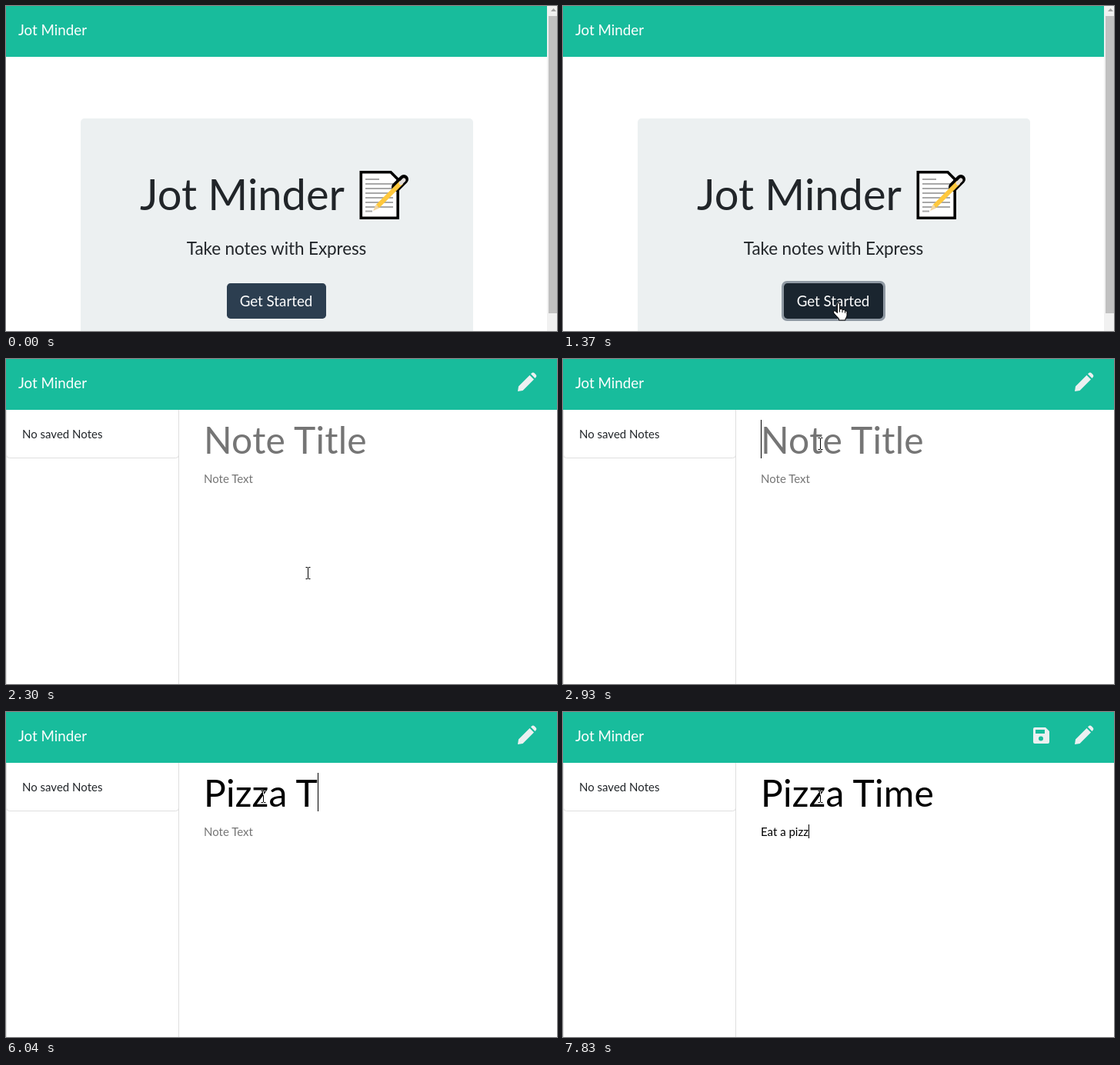
Write an HTML page that moves like this. It is 716 px wide and 422 px high and loops after 8000 ms.

```html
<!DOCTYPE html>
<html lang="en">
<head>
<meta charset="utf-8">
<title>Jot Minder</title>
<style>
html, body { margin: 0; width: 716px; height: 422px; overflow: hidden; background: #fff; }
svg { display: block; }
text { font: 15px Lato, sans-serif; fill: #212529; white-space: pre; }
.large { font-size: 18.75px; fill: #fff; }
.title { font-size: 48px; letter-spacing: .22px; }
.cursor { fill: #fff; stroke: #000; stroke-linejoin: round; }
#beam { fill: none; stroke: #fff; mix-blend-mode: difference; }
</style>
</head>
<body>
<svg width="716" height="422" viewBox="0 0 716 422">
  <rect width="716" height="422" fill="#fff"/>
  <rect width="716" height="66" fill="#18bc9c"/>
  <text class="large" x="16" y="37.5">Jot Minder</text>

  <g id="home">
    <rect x="703" width="13" height="422" fill="#f1f1f1"/>
    <rect x="705" y="13" width="11" height="386" fill="#c1c1c1"/>
    <path d="M708 7l3.5-4 3.5 4z" fill="#a3a3a3"/>
    <rect x="97" y="146" width="510" height="300" rx="5" fill="#ecf0f1"/>
    <text x="174" y="265" style="font-size:56px">Jot Minder</text>
    <g id="memo">
      <path d="M461.3 215.8H500L509.2 225V275.2H461.3Z" fill="#fff" stroke="#000" stroke-width="3.6"/>
      <path d="M467 225h18M467 231h36M467 237h36M467 243h36M467 249h36M467 255h36M467 261h36M467 266.5h9" stroke="#a8a8a8" stroke-width="1.8"/>
      <path d="M507 235L517 225" stroke="#000" stroke-width="12" stroke-linecap="round"/>
      <path d="M483 260L514 229" stroke="#ffc83d" stroke-width="6"/>
      <path d="M513 230L517 226" stroke="#e3dedb" stroke-width="5" stroke-linecap="round"/>
      <path d="M477 266l3.5-8 4.5 4.5z" fill="#f3d6a0"/>
    </g>
    <text x="351.5" y="322.5" text-anchor="middle" style="font-size:22.5px;letter-spacing:-.1px">Take notes with Express</text>
    <rect id="ring" x="284" y="357" width="135" height="52" rx="7" fill="#8f99a3"/>
    <rect id="button" x="287" y="360" width="129" height="46" rx="4.7"/>
    <text class="large" x="351" y="390" text-anchor="middle">Get Started</text>
  </g>

  <g id="notes">
    <path d="M.5 66V422M224.5 66V422" stroke="#dfdfdf"/>
    <g id="empty">
      <path d="M.5 66V124.5q0 4 4 4H220.5q4 0 4-4V66" fill="none" stroke="#dfdfdf"/>
      <text x="21" y="103">No saved Notes</text>
    </g>
    <g fill="#ecf0f1">
      <path d="M665 42l1-6.5L680.5 21l5.5 5.5L671.5 41zM682 19.5l1.2-1.2q1.7-1.7 3.4 0l2 2q1.7 1.7 0 3.4l-1.2 1.2z"/>
      <g id="save">
        <path d="M613 20H627l5 5V39q0 2-2 2H613q-2 0-2-2V22q0-2 2-2z"/>
        <path d="M614 23h12v5h-12z" fill="#18bc9c"/>
        <circle cx="621" cy="34.5" r="3" fill="#18bc9c"/>
      </g>
    </g>
    <text id="title" class="title" x="257" y="122.5"></text>
    <text id="body" x="257" y="160.5"></text>
    <rect id="caret" width="1"/>
  </g>

  <path id="arrow" class="cursor" d="M0 0v16l4-4 3 7 2.5-1-3-7h5.5z"/>
  <g id="hand" class="cursor">
    <path d="M-1.5 13V1.5q0-1.5 1.5-1.5t1.5 1.5V8q3-.8 3.5 1 3-.6 3.5 1.2 2.5-.3 2.5 2V16q0 2.5-2 4.5v2h-8.5v-2L-6 13.5q-1.4-2.5 0-3.2 1.6-.6 4.5 2.7z"/>
    <path d="M1.5 8v4M5 9v3.5M8.5 10.2v3" fill="none"/>
  </g>
  <path id="beam" d="M-3-7.5h2.5m1 0H3M0-7V7M-3 7.5h2.5m1 0H3"/>
</svg>
<script>
const LOOP = 8000;
const titleKeys = [4180, 4410, 4560, 4790, 5020, 5890, 6040, 6117, 6193, 6270];
const bodyKeys = [6900, 7052, 7128, 7204, 7280, 7450, 7527, 7603, 7680, 7830];
const focusTitle = 2760, focusBody = 6440;
const $ = id => document.getElementById(id);
const show = (id, on) => $(id).style.display = on ? "" : "none";
const clamp = v => Math.max(0, Math.min(1, v));
const mix = (a, b, u) => a + (b - a) * u;

// Progress held in equal steps, as in a screen recording
const stepped = (t, from, to, steps) =>
  clamp(Math.floor((t - from) / (to - from) * (steps - 1) + 1e-6) / (steps - 1));

function pointer(t) {
  if (t < 2070) {
    const u = stepped(t, 370, 990, 9), e = 1 - (1 - u) ** 2;
    const x = mix(648, 358, e);
    return { x, y: mix(303, 385.5, e), kind: x < 416 ? "hand" : "arrow" };
  }
  if (t >= 2930) return { x: 334.5, y: 110, kind: "beam" };
  const u = mix(.08, 1, stepped(t, 2070, 2760, 10)), v = 1 - u;
  return {
    x: Math.floor(v * v * 357 + 2 * u * v * 440 + u * u * 329) + .5,
    y: Math.round(mix(385, 107, u)),
    kind: "beam"
  };
}

function type(id, text, keys, t, hint) {
  const typed = text.slice(0, keys.filter(k => k <= t).length);
  $(id).textContent = typed || hint;
  $(id).style.fill = typed ? "#000" : "#757575";
  return typed ? $(id).getComputedTextLength() : 0;
}

function draw(t) {
  const onNotes = t >= 1450;
  show("home", !onNotes);
  show("notes", onNotes);
  show("empty", t >= 1520);
  show("save", t >= 6976);

  const p = pointer(t);
  for (const kind of ["arrow", "hand", "beam"]) show(kind, t >= 370 && p.kind === kind);
  $(p.kind).setAttribute("transform", `translate(${p.x} ${p.y})`);

  $("ring").style.opacity = t < 1220 ? 0 : clamp((t - 1145) / 150);
  $("button").style.fill = t >= 1220 ? "#1a252f" : t >= 370 && p.kind === "hand" ? "#1e2b37" : "#2c3e50";

  const titleWidth = type("title", "Pizza Time", titleKeys, t, "Note Title");
  const bodyWidth = type("body", "Eat a pizz", bodyKeys, t, "Note Text");
  const inBody = t >= focusBody;
  const lastInput = Math.max(...[focusTitle, focusBody, ...titleKeys, ...bodyKeys].filter(k => k <= t));
  show("caret", t >= focusTitle && (t - lastInput) % 1100 < 550);
  const caret = $("caret");
  caret.setAttribute("x", 257 + Math.floor(inBody ? bodyWidth : titleWidth));
  caret.setAttribute("y", inBody ? 146 : 79);
  caret.setAttribute("height", inBody ? 18 : 50);
}

const start = performance.now();
function tick() {
  draw((performance.now() - start) % LOOP);
  requestAnimationFrame(tick);
}
tick();
</script>
</body>
</html>
```
